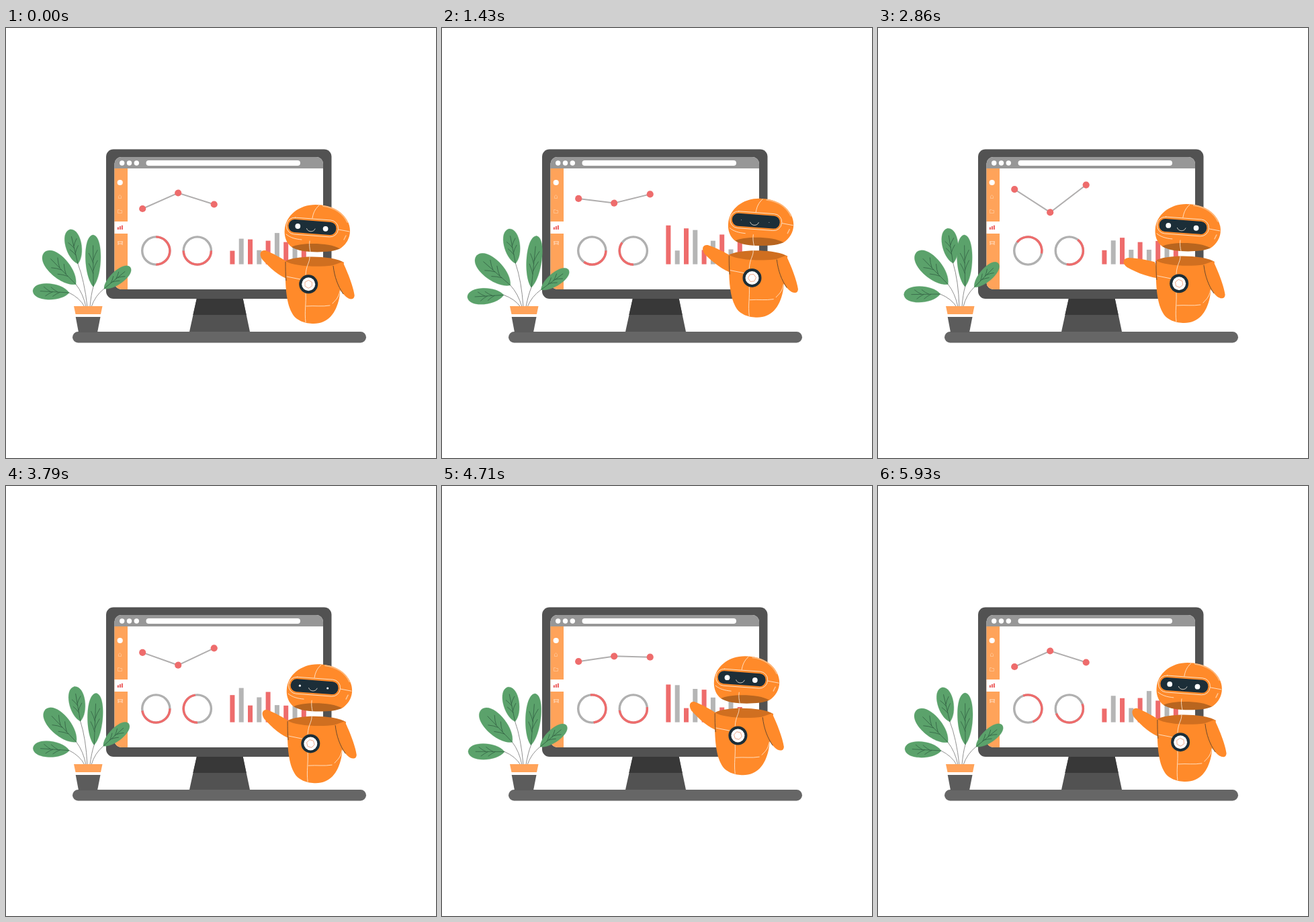
An HTML page that plays this animation: 640x640 px, repeating every 6 s.

```html
<!DOCTYPE html>
<html lang="en">
<head>
<meta charset="utf-8">
<title>Robot presenting a dashboard</title>
<style>
html, body { margin: 0; width: 100%; height: 100%; overflow: hidden; background: #fff; }
svg { display: block; width: 100%; height: 100%; }
.seam { fill: none; stroke: #fff3e4; stroke-width: .8; stroke-linecap: round; }
.shade { fill: none; stroke: #4a3a2c; stroke-width: .8; }
</style>
</head>
<body>
<svg id="stage" viewBox="0 0 640 640">
  <defs><clipPath id="glass"><rect x="161.5" y="192" width="310.5" height="197" rx="10"/></clipPath></defs>

  <!-- desk and monitor -->
  <path d="M284 402H352.5L363.2 453H272.8Z" fill="#525252"/>
  <path d="M284 402H352.5L357.7 427H278.300Z" fill="#383838"/>
  <rect x="149" y="180.5" width="335.5" height="222.5" rx="11" fill="#525252"/>
  <g clip-path="url(#glass)">
    <path d="M161 192H473V390H161Z" fill="#fff"/>
    <path d="M161 192H473V209H161Z" fill="#979797"/>
    <path d="M161 209H181V390H161Z" fill="#ffa35a"/>
    <path d="M161 288H181V306H161Z" fill="#fff"/>
  </g>
  <g fill="#fff">
    <circle cx="172.7" cy="201" r="3.7"/><circle cx="183.5" cy="201" r="3.7"/><circle cx="194.3" cy="201" r="3.7"/>
    <rect x="208.5" y="197" width="229.5" height="8" rx="4"/>
    <circle cx="169.7" cy="230" r="4.1"/>
  </g>
  <g fill="none" stroke="#ffd3ae" stroke-width=".6">
    <path d="M167.5 253.5V250.5L169.5 248.5L171.5 250.5V253.5Z"/>
    <path d="M166.5 275.5V270.5H169L170 271.5H172.5V275.5Z"/>
    <path d="M166 318H174M167 318V323M173 318V323M167 321H173" stroke="#fff"/>
  </g>
  <path d="M165.7 296.5H168V300H165.7ZM168.8 295H171V300H168.8ZM171.8 293.7H174V300H171.8Z" fill="#ee6c6c"/>
  <polyline id="line" fill="none" stroke="#b0aeae" stroke-width="2"/>
  <g id="charts"></g>
  <rect x="99" y="452" width="437" height="16.5" rx="8.2" fill="#666"/>

  <!-- plant -->
  <g id="plant"></g>
  <path d="M101 414H143.5L141 426H103.5Z" fill="#ffa35a"/>
  <path d="M103 426H141.5L140.5 430H104Z" fill="#fff"/>
  <path d="M103.7 430H140.5L136 453H108Z" fill="#5c5c5c"/>

  <!-- robot -->
  <g id="robot">
    <path id="arm" d="M386 331C397 335 411 343 418 348L420 374C408 370 392 357 381 344C376 336 379 330 386 331Z" fill="#ff8a2a"/>
    <path d="M416 347C415 382 417 408 425 423C431 436 446 440 458 440C479 440 491 425 496 402C499 386 500 361 503 349Z" fill="#ff8a2a"/>
    <path d="M416 347C430 338 486 338 503 349C488 357 431 357 416 347Z" fill="#d06f20"/>
    <path d="M416 348C416 358 416 367 417 376" class="shade"/>
    <path d="M501 348C508 362 517 385 518.7 398C518 406 510 404 505 399C496 391 489 374 487 353Z" fill="#ff8a2a"/>
    <path d="M487 354C489 371 494 384 502 396" class="shade"/>
    <path d="M452 341C452 350 447 352 446 367M446 395C447 410 444 422 446 438M447 414C460 413 470 415 482 413M418 370L438 374M497 391C495 403 489 406 486 410" class="seam"/>
    <circle cx="450.2" cy="381.3" r="14" fill="#1c2e38"/>
    <circle cx="450.2" cy="381.3" r="10" fill="#fff"/>
    <path id="badge" d="M0 -6L5.2 -3V3L0 6L-5.2 3V-3Z" fill="none" stroke="#e99a78" stroke-width=".8"/>
    <path d="M425 326C417 320 414 310 414.700 301C416 279 436 263 461 263C490 263 512 281 512 302C512 313 506 323 497 328.500Z" fill="#ff8a2a"/>
    <path d="M425 326C438 319 482 319 497 328.5C484 335 439 336 425 326Z" fill="#b8651f"/>
    <path d="M472 265C489 267 502 276 508 289" fill="none" stroke="#ffb779" stroke-width="2" stroke-linecap="round"/>
    <path d="M466 264C459 270 457 277 456 283M495 300L511 303M452 317C451 323 452 328 453 333M417 307C423 312 430 314 440 315" class="seam"/>
    <path d="M503 315L506 309" stroke="#ffc48f" stroke-width="1.5" stroke-linecap="round"/>
    <g transform="rotate(4.2 456 296.5)">
      <rect x="417.5" y="284" width="77" height="25" rx="12" class="seam"/>
      <rect x="420.5" y="287" width="71" height="19" rx="9" fill="#1c2e38"/>
    </g>
    <path d="M447.5 298.5C449 304 458 304.5 460 299" class="seam"/>
    <circle class="eye" cx="434.3" cy="295" fill="#fff"/>
    <circle class="eye" cx="475.6" cy="298.8" fill="#fff"/>
  </g>
</svg>
<script>
const LOOP = 6000, STEP = LOOP / 84, BEAT = LOOP / 5;
const RED = '#ee6c6c', GREY = '#b5b5b5';
const $ = id => document.getElementById(id);

function add(parent, tag, attrs) {
  const el = document.createElementNS('http://www.w3.org/2000/svg', tag);
  for (const k in attrs) el.setAttribute(k, attrs[k]);
  return parent.appendChild(el);
}

const clamp = u => Math.min(1, Math.max(0, u));
const ease = (t, from, to) => {
  const u = clamp((t - from) / (to - from));
  return u * u * (3 - 2 * u);
};
const ramp = (t, from, to) => clamp((t - from) / (to - from));
const thereAndBack = (t, from, peak, to) => ease(t, from, peak) - ease(t, peak, to);

// Eases from rest through four poses, one per beat, and back to rest.
function pose(t, poses) {
  const keys = [0, ...poses, 0], i = Math.floor(t / BEAT);
  return keys[i] + (keys[i + 1] - keys[i]) * ease(t, i * BEAT, (i + 1) * BEAT);
}

// Charts
const charts = $('charts');
const dots = [[203.2, 269, -1], [256.2, 245.5, 1], [309.7, 262.5, -1]].map(([x, y, dir]) =>
  ({ x, y, dir, el: add(charts, 'circle', { cx: x, r: 5.1, fill: RED }) }));

const rings = [[223.3, -90], [284.8, 0]].map(([x, lead]) => {
  const shape = { cx: x, cy: 331.5, r: 20.6, fill: 'none', 'stroke-width': 3.4 };
  add(charts, 'circle', { ...shape, stroke: '#b0b0b0' });
  return { x, lead, el: add(charts, 'circle', { ...shape, stroke: RED, pathLength: 360 }) };
});
// Four turns, slower in the middle of the loop
const spin = t => 450 * ramp(t, 0, 1430) + 360 * ramp(t, 1430, 3790) + 630 * ramp(t, 3790, LOOP);

const rise = Math.sin, fall = a => -Math.sin(a), twice = a => -Math.cos(2 * a);
const bars = [twice, fall, rise, twice, fall, Math.cos, rise, fall, rise].map((wave, i) => ({
  height: t => 39 - i + (19 - 1.3 * i) * wave(2 * Math.PI * t / LOOP),
  el: add(charts, 'rect', { x: 333.4 + i * 13.3, width: 7, fill: i % 2 ? GREY : RED })
}));

// Leaves: base, tip, half width, stem foot, sway in degrees about the pot
const leaves = [
  [94, 394, 40, 391, 11.5, 117, [-6.7, -6.4, 1, -3]],
  [104, 381.5, 57, 334, 14.5, 119, [-4.5, -.2, 1.3, 1]],
  [107, 351, 95, 300, 11.5, 121, [2, 4.7, 3.5, 1.5]],
  [130, 385, 129.5, 308, 11, 125, [7, -2, 2.3, 5]],
  [146, 388, 185, 356, 9.5, 127, [4.5, -7.2, -2.6, .3]]
].map(([bx, by, tx, ty, w, foot, sway]) => {
  const el = add($('plant'), 'g', {});
  const len = Math.hypot(tx - bx, ty - by);
  const turn = Math.atan2(ty - by, tx - bx) * 180 / Math.PI;
  const at = f => (f * len).toFixed(1);
  const side = s => `M0 0C${at(.2)} ${s * w * 1.3} ${at(.98)} ${s * w * 1.45} ${at(1)} 0Z`;
  const vein = (f, s) => `M${at(f)} 0Q${at(f + .1)} ${s * w * .2} ${at(f + .2)} ${s * w * .6}`;
  add(el, 'path', {
    d: `M${bx} ${by}Q${bx + (foot - bx) * .7} ${by + (414 - by) * .4} ${foot} 415`,
    fill: 'none', stroke: '#858585', 'stroke-width': .9
  });
  const blade = add(el, 'g', { transform: `translate(${bx} ${by}) rotate(${turn})` });
  add(blade, 'path', { d: side(-1) + side(1), fill: '#5ba26b', stroke: '#5ba26b', 'stroke-width': .3 });
  add(blade, 'path', {
    d: `M0 0H${at(.8)}` + [.25, .45].map(f => vein(f, -1) + vein(f + .06, 1)).join(''),
    fill: 'none', stroke: '#2f5b40', 'stroke-width': .7
  });
  return { el, sway };
});

const eyes = document.querySelectorAll('.eye');
const openness = t => Math.min(1, ...[1430, 3850].map(c => Math.max(.12, Math.abs(t - c) / 160)));

function draw(t) {
  const x = pose(t, [13, -5, 4, -10]), y = pose(t, [-10, -3, 3, -10]);
  $('robot').setAttribute('transform', `translate(${x} ${y})`);
  const reach = pose(t, [0, 1.5, 0, 0]);
  $('arm').setAttribute('transform',
    `translate(420 362) rotate(${-16 * reach}) scale(${1 + .13 * reach} 1) translate(-420 -362)`);
  $('badge').setAttribute('transform', `translate(450.2 381.3) rotate(${t * 360 / LOOP})`);
  eyes.forEach(e => e.setAttribute('r', 3.9 * openness(t)));

  const swing = 29 * thereAndBack(t, 0, 2780, 5720);
  const points = dots.map(d => {
    const cy = d.y + d.dir * swing;
    d.el.setAttribute('cy', cy);
    return [d.x, cy];
  });
  $('line').setAttribute('points', points.join(' '));

  const span = 180 - 58 * thereAndBack(t, 0, 790, 4700);
  for (const r of rings) {
    r.el.setAttribute('stroke-dasharray', `${span} ${360 - span}`);
    r.el.setAttribute('transform', `rotate(${spin(t) + r.lead} ${r.x} 331.5)`);
  }
  for (const b of bars) {
    const h = b.height(t);
    b.el.setAttribute('y', 351.6 - h);
    b.el.setAttribute('height', h);
  }
  for (const l of leaves) l.el.setAttribute('transform', `rotate(${pose(t, l.sway)} 122 414)`);
}

const start = performance.now();
function tick() {
  const t = (performance.now() - start) % LOOP;
  draw(Math.floor(t / STEP + .05) % 84 * STEP);
  requestAnimationFrame(tick);
}
tick();
</script>
</body>
</html>
```
